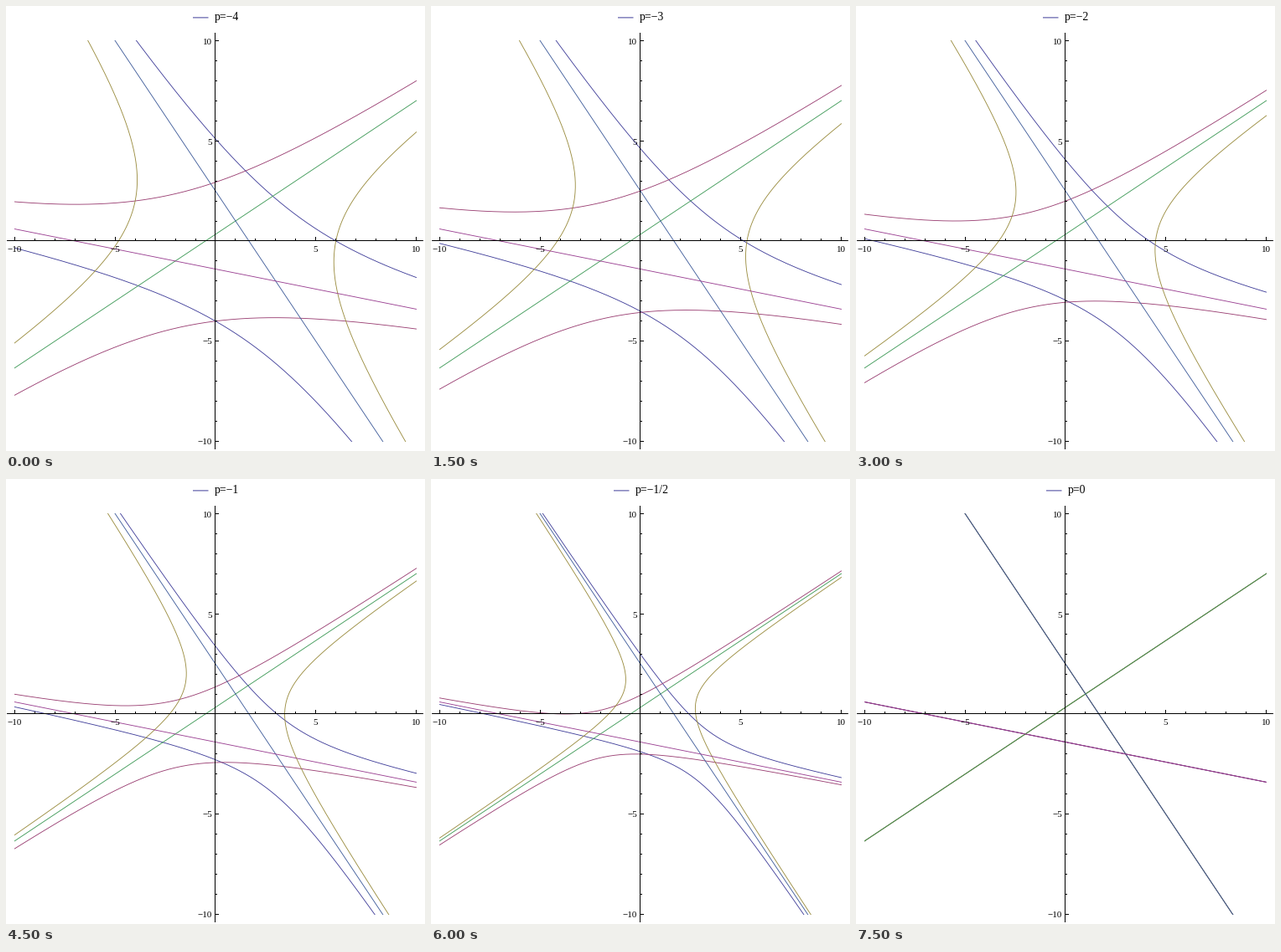
A matplotlib script for the animation above (8 s loop, 500 px wide and 532 px high).

```python
import numpy as np
import matplotlib.pyplot as plt
from matplotlib.animation import FuncAnimation
from matplotlib.patches import Rectangle

W, H, DPI = 500, 532, 100
CX, CY, UNIT = 249.95, 280.95, 23.95
PT = 72 / DPI  # points per pixel
STEP = 500

# p, legend text, left end of the legend, number of steps shown
STATES = [
    (-4, "p=\u22124", 223, 3),
    (-3, "p=\u22123", 223, 3),
    (-2, "p=\u22122", 223, 3),
    (-1, "p=\u22121", 223, 3),
    (-0.5, "p=\u22121/2", 218, 3),
    (0, "p=0", 227, 1),
]
TIMELINE = [s for s in STATES for _ in range(s[3])]

# Triangle corners; each conic is u * v = p / 4 in two barycentric coordinates
A, B, C = np.array([(1, 1), (-2, -1), (3, -2)], float)
BLUE = (0.2472, 0.24, 0.6)
CONICS = [
    (A, B, C, BLUE),
    (A, C, B, (0.6, 0.24, 0.4429)),
    (B, C, A, (0.6, 0.547, 0.24)),
]
SIDES = [
    (A, B, (0.24, 0.6, 0.3369)),
    (A, C, (0.24, 0.3536, 0.6)),
    (B, C, (0.6, 0.24, 0.5632)),
]


def px(x, y):
    return CX + UNIT * np.asarray(x), CY - UNIT * np.asarray(y)


def cell(v):
    """Centre of the pixel that holds v."""
    return np.floor(v) + 0.5


def side(a, b):
    t = np.array([-12.0, 12.0])[:, None]
    return px(*(a + t * (b - a)).T)


def branches(a, b, c, p):
    if p == 0:
        return [side(a, c), side(b, c)]
    t = np.linspace(-4, 4, 600)
    m = np.sqrt(-p) / 2
    out = []
    for s in (1, -1):
        u, v = s * m * np.exp(t)[:, None], -s * m * np.exp(-t)[:, None]
        out.append(px(*(u * a + v * b + (1 - u - v) * c).T))
    return out


fig = plt.figure(figsize=(W / DPI, H / DPI), dpi=DPI, facecolor="white")
ax = fig.add_axes([0, 0, 1, 1])
ax.set(xlim=(0, W), ylim=(H, 0))
ax.axis("off")

frame_box = Rectangle((10, 41), 480, 480, transform=ax.transData)


def curve(color, z):
    line, = ax.plot([], [], color=color, lw=0.87 * PT, zorder=z)
    line.set_clip_path(frame_box)
    return line


def stroke(x0, y0, x1, y1):
    ax.plot([x0, x1], [y0, y1], color="black", lw=PT, zorder=5,
            snap=False, solid_capstyle="butt")


def label(x, y, text, size, ha):
    return ax.text(x, y, text, fontsize=size * PT, family="Liberation Serif",
                   ha=ha, va="baseline", zorder=6)


conic_lines = [[curve(k[3], 1) for _ in range(2)] for k in CONICS]
for a, b, color in SIDES:
    curve(color, 2).set_data(*side(a, b))

ox, oy = cell(CX), cell(CY)
stroke(1, oy, 498, oy)
stroke(ox, 32, ox, 530)
for n in range(-10, 11):
    if n == 0:
        continue
    x, y = map(cell, px(n, n))
    size = 4.5 if n % 5 == 0 else 2.5
    stroke(x, oy, x, oy - size)
    stroke(ox, y, ox + size, y)
    if n % 5 == 0:
        name = str(n).replace("-", "\u2212")
        label(x - 0.5, 293.5, name, 11, "center")
        label(246, y + 4, name, 11, "right")

key, = ax.plot([], [], color=BLUE, lw=PT, snap=False, solid_capstyle="butt")
title = label(0, 17.5, "", 13.7, "left")


def draw(i):
    p, text, left, _ = TIMELINE[i]
    for (a, b, c, _), lines in zip(CONICS, conic_lines):
        for line, pts in zip(lines, branches(a, b, c, p)):
            line.set_data(*pts)
    key.set_data([left, left + 18.5], [13.9, 13.9])
    title.set_text(text)
    title.set_x(left + 26)
    return []


anim = FuncAnimation(fig, draw, frames=len(TIMELINE), interval=STEP,
                     repeat=True, repeat_delay=0)
plt.show()
```
